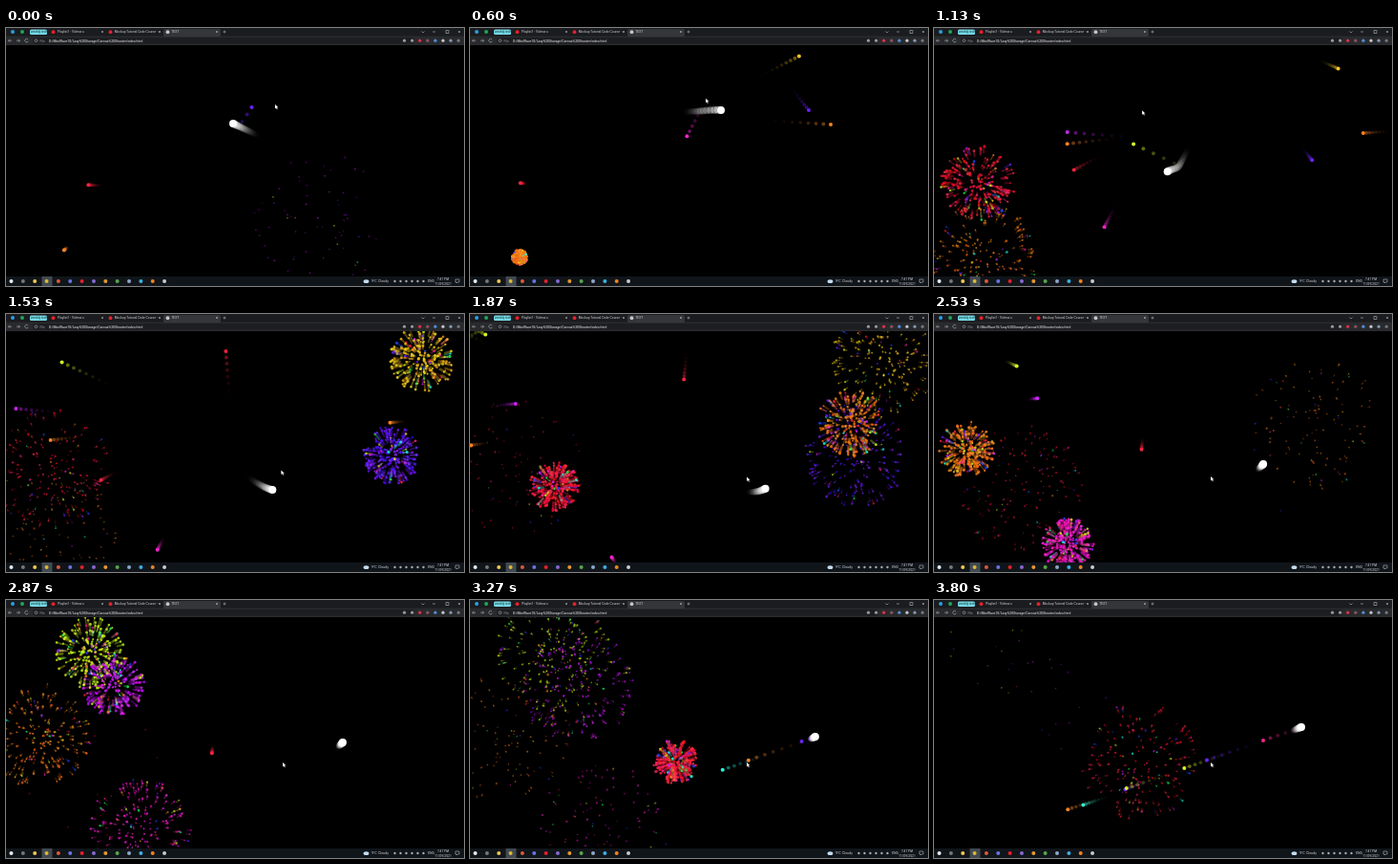
Animation, 480 px wide and 270 px high, one loop 3870 ms. Source, as an HTML page with a canvas:

```html
<!DOCTYPE html>
<html lang="en">
<head>
<meta charset="utf-8">
<title>Canvas shooter</title>
<style>
html, body { margin: 0; width: 100%; height: 100%; overflow: hidden; background: #000; }
canvas, svg { position: absolute; left: 0; top: 0; width: 480px; height: 270px; display: block; }
text { font-family: Roboto, "Open Sans", sans-serif; font-size: 3.6px; fill: #d0d2d5; }
.small { font-size: 3.3px; }
.line { fill: none; stroke: #b4b7bb; stroke-width: .6; }
</style>
</head>
<body>
<canvas id="game"></canvas>
<svg viewBox="0 0 480 270">
  <rect width="480" height="9" fill="#1b1c1f"/>
  <rect y="8.5" width="480" height="9.5" fill="#292a2d"/>
  <rect x="165" y="1" width="60" height="8" rx="1.5" fill="#35363a"/>
  <rect x="28" y="10" width="400" height="6.6" rx="3.3" fill="#1d1e21"/>
  <circle cx="7" cy="4" r="2" fill="#2b9fe0"/>
  <circle cx="17" cy="4" r="2" fill="#22a45a"/>
  <rect x="25" y="1.5" width="18" height="5.4" rx="1.5" fill="#73d8e4"/>
  <text x="26" y="5.4" class="small" style="fill:#173238">weekly tech</text>
  <g id="tabs"></g>
  <path class="line" d="M227.500 4h3m-1.500-1.500v3M447 4h3M461 2.500h3v3h-3zM435.500 3.500l1.500 1.500 1.500-1.500"/>
  <path class="line" d="M6 13.200H2.500l1.500-1.500m-1.500 1.500l1.500 1.500M11 13.200h3.500l-1.500-1.500m1.500 1.500l-1.500 1.500M23 12a1.800 1.800 0 1 0 .3 1.800"/>
  <circle class="line" cx="31.500" cy="13.200" r="1.400"/>
  <text x="35.500" y="14.600" class="small" style="fill:#9a9da1">File</text>
  <text x="45" y="14.600" style="font-size:3.450px;fill:#f4f4f4">D:/MiniWave10/Lazy%20Storage/Canvas%20Shooter/index.html</text>
  <g id="tools"></g>
  <rect y="260" width="480" height="10" fill="#10151a"/>
  <rect x="37.500" y="260" width="11" height="10" fill="#414951"/>
  <g id="apps"></g>
  <ellipse cx="377.500" cy="265.200" rx="2.900" ry="1.900" fill="#c3dcf0"/>
  <text x="383" y="266.400">9°C</text>
  <text x="390" y="266.400">Cloudy</text>
  <text x="442" y="266.400">ENG</text>
  <text x="458" y="264.300" text-anchor="middle" class="small">7:47 PM</text>
  <text x="458" y="268.600" text-anchor="middle" class="small">11/09/2021</text>
  <path class="line" d="M471 263h4v3h-2l-1 1v-1h-1z"/>
  <path id="cursor" d="M0 0v4.600l1.100-1 .8 1.700.8-.4-.8-1.600h1.500z" fill="#fff"/>
</svg>
<script>
const LOOP = 3870, STEP = 200 / 3;
const DRAG = 1.3, BOUNCE = .85;
const HUE = {
  red: 352, orange: 27, yellow: 47, lime: 70, green: 135, cyan: 173,
  blue: 230, purple: 260, violet: 288, magenta: 312, pink: 330
};
const hues = Object.values(HUE);
const hsl = (h, l = 55) => `hsl(${h}, 92%, ${l}%)`;

const $ = id => document.getElementById(id);
const canvas = $('game'), ctx = canvas.getContext('2d'), cursor = $('cursor');
const ratio = window.devicePixelRatio || 1;
canvas.width = 480 * ratio;
canvas.height = 270 * ratio;

// Browser and taskbar details
const mark = (x, y, r, fill) => `<circle cx="${x}" cy="${y}" r="${r}" fill="${fill}"/>`;
const cross = (x, y) => `<path class="line" d="M${x} ${y}l2 2m0-2l-2 2"/>`;
const titles = ['Playlist1 - Vidmoru', 'Mockup Tutorial Code Course -', 'TEST'];
$('tabs').innerHTML = cross(474, 3) + titles.map((title, i) =>
  mark(49.5 + 60 * i, 4.2, 1.9, i < 2 ? '#e8202c' : '#c6c8cb')
  + `<text x="${54 + 59.7 * i}" y="5.4" class="small">${title}</text>`
  + cross(100 + 60 * i, 3)).join('');
$('tools').innerHTML = ['#999', '#999', '#df3347', '#8c5360', '#4e8fdc', '#c4c7cb', '#8996b5', '#777']
  .map((c, i) => mark(417.5 + 8.1 * i, 13.2, 1.6, c)).join('');
const apps = ['#e6edf2', '#777', '#f2c94c', '#d8b93c', '#e05a3c', '#6874e8', '#e8202c',
  '#8868d8', '#e89a2c', '#58a848', '#8fa6c8', '#3cb0e8', '#ee8424', '#c8ccd0'];
$('apps').innerHTML = apps.map((c, i) => mark(5.5 + 12.35 * i, 265, 2, c)).join('')
  + Array.from({ length: 6 }, (_, i) => mark(407.5 + 6 * i, 265, 1.2, '#a9adb2')).join('');

function random(seed) {
  return () => {
    seed = seed + 0x6D2B79F5 | 0;
    let n = Math.imul(seed ^ seed >>> 15, 1 | seed);
    n = n + Math.imul(n ^ n >>> 7, 61 | n) ^ n;
    return ((n ^ n >>> 14) >>> 0) / 4294967296;
  };
}

// Smooth path through "time x y" stops, straight beyond both ends.
function path(stops) {
  const p = stops.split(',').map(s => s.split(' ').map(Number));
  const last = p.length - 1;
  const tangent = (i, a) => {
    const from = p[Math.max(0, i - 1)], to = p[Math.min(last, i + 1)];
    return (to[a] - from[a]) / (to[0] - from[0]);
  };
  return t => {
    let i = 0;
    while (i < last - 1 && t > p[i + 1][0]) i++;
    const h = p[i + 1][0] - p[i][0], u = (t - p[i][0]) / h, v = 1 - u;
    return [1, 2].map(a => {
      if (u < 0) return p[i][a] + tangent(i, a) * h * u;
      if (u > 1) return p[i + 1][a] + tangent(i + 1, a) * h * (u - 1);
      return v * v * (1 + 2 * u) * p[i][a] + u * u * (3 - 2 * u) * p[i + 1][a]
        + h * u * v * (v * tangent(i, a) - u * tangent(i + 1, a));
    });
  };
}

const playerAt = path('-240 267 114,0 238 100,250 214 90,500 241 87,620 266 87,783 272 106,1040 257 144,1130 245 150,1230 240 158,1340 257 173,1530 279 184,1800 304 185,2200 334 167,2870 353 149,3270 362 143,3800 385 133');
const pointerAt = path('0 282 80,400 262 74,1130 218 86,1530 288 163,1800 290 170,2200 290 170,3800 290 170');

// Every body leaves the player, slows by drag and bounces off the page edges.
const reach = ms => (1 - Math.exp(-DRAG * ms / 1000)) / DRAG;
const fold = (v, lo, hi) =>
  v < lo ? lo + (lo - v) * BOUNCE : v > hi ? hi - (v - hi) * BOUNCE : v;

function body(hue, start, end, vx, vy) {
  const [x, y] = playerAt(start);
  const at = t => {
    const d = reach(t - start);
    return [fold(x + vx * d, 0, 480), fold(y + vy * d, 18, 260)];
  };
  return { hue, start, end, at };
}

// The aim is where the body would end without walls.
function rocket(color, start, end, aimX, aimY) {
  const [x, y] = playerAt(start), d = reach(end - start);
  return body(HUE[color], start, end, (aimX - x) / d, (aimY - y) / d);
}

const rockets = [
  rocket('violet', -2600, -1080, 331, 203),
  rocket('orange', -2600, 550, 52, -243),
  rocket('red', -1400, 810, 46, 162),
  rocket('purple', -55, 1295, 404, -135),
  rocket('yellow', 150, 1265, 436, -17),
  rocket('orange', 240, 1580, 576, 114),
  rocket('magenta', 500, 2330, 140, 283),
  rocket('red', 600, 1675, 88, 180),
  rocket('orange', 783, 2310, -40, 142),
  rocket('violet', 872, 2605, -132, 88),
  rocket('lime', 1040, 2560, -104, -26),
  rocket('red', 1215, 3100, 215, -160)
];

const volley = ['cyan', 'orange', 'purple', 'lime', 'lime', 'purple', 'pink'].map((color, i) => {
  const speed = i % 2 ? 480 : 400;
  return body(HUE[color], 2997 + 118 * i, LOOP, -speed, .34 * speed);
});

const bursts = rockets.map(({ hue, end, at }, n) => {
  const rnd = random(n * 97 + 11);
  const [x, y] = at(end);
  const parts = Array.from({ length: 200 }, () => {
    const angle = rnd() * Math.PI * 2, far = 82 * (.04 + .96 * rnd() ** .65);
    const own = rnd() < .78;
    return {
      dx: Math.cos(angle) * far, dy: Math.sin(angle) * far,
      life: .75 + .5 * rnd(), size: 1.1 + .7 * rnd(),
      color: own ? hsl(hue + 16 * (rnd() - .5), 48 + 10 * rnd()) : hsl(hues[Math.floor(rnd() * hues.length)])
    };
  });
  return { birth: end, x, y, parts };
});

function dot(x, y, r, color, alpha) {
  ctx.globalAlpha = alpha;
  ctx.fillStyle = color;
  ctx.beginPath();
  ctx.arc(x, y, r, 0, Math.PI * 2);
  ctx.fill();
}

function drawBurst({ birth, x, y, parts }, t) {
  const age = (t - birth) / 1000;
  if (age < 0 || age > 1.3) return;
  const grow = a => 1 - Math.exp(-2 * Math.max(0, a));
  const head = grow(age), tail = grow(age - .07);
  ctx.lineCap = 'round';
  for (const p of parts) {
    const left = 1 - age / p.life;
    if (left <= 0) continue;
    const r = p.size * (.5 + .5 * left), alpha = .3 + .62 * left;
    const hx = x + p.dx * head, hy = y + p.dy * head;
    ctx.globalAlpha = alpha * .45;
    ctx.strokeStyle = p.color;
    ctx.lineWidth = r * 1.5;
    ctx.beginPath();
    ctx.moveTo(x + p.dx * tail, y + p.dy * tail);
    ctx.lineTo(hx, hy);
    ctx.stroke();
    dot(hx, hy, r, p.color, alpha);
  }
}

function drawTrail(at, start, t, r, color, gap, count) {
  for (let i = count; i >= 0; i--) {
    const past = t - i * gap;
    if (past < start) continue;
    const [x, y] = at(past), fade = 1 - i / (count + 1);
    dot(x, y, r * (.75 + .25 * fade), color, i ? .55 * fade * fade : 1);
  }
}

function draw(t) {
  ctx.setTransform(ratio, 0, 0, ratio, 0, 0);
  ctx.globalAlpha = 1;
  ctx.fillStyle = '#000';
  ctx.fillRect(0, 0, 480, 270);
  bursts.forEach(b => drawBurst(b, t));
  for (const b of [...rockets, ...volley]) {
    if (t >= b.start && t < b.end) drawTrail(b.at, b.start, t, 2, hsl(b.hue), 21, 8);
  }
  drawTrail(playerAt, -LOOP, t, 4, '#fff', 16, 14);
  cursor.setAttribute('transform', `translate(${pointerAt(t)})`);
}

const begin = performance.now();
function tick() {
  const t = (performance.now() - begin) % LOOP;
  draw(Math.min(57, Math.floor((t + 3.5) / STEP)) * STEP);
  requestAnimationFrame(tick);
}
tick();
</script>
</body>
</html>
```
